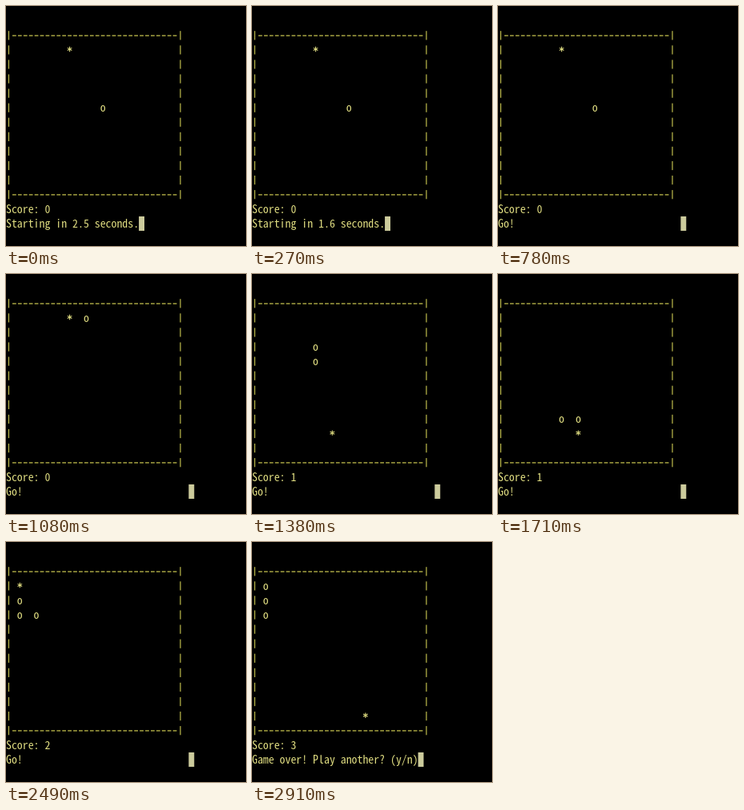
An HTML page with a canvas that plays this animation: 300x300 px, repeating every 2940 ms.

```html
<!DOCTYPE html>
<html>
<head>
<meta charset="utf-8">
<style>
html, body { margin: 0; width: 100%; height: 100%; overflow: hidden; background: #000; }
canvas { display: block; }
</style>
</head>
<body>
<canvas id="stage" width="300" height="300"></canvas>
<script>
const ctx = document.getElementById('stage').getContext('2d');
const LOOP = 2940, TICK = 30;
const CELL = 6.92, LINE = 18.08, BASE = 41.8; // terminal grid
const START = 24.9, STEP = 2.2, GO = 25;      // in ticks
const CRASH = 28;                             // move that hits the wall
const MEALS = [6, 15, 27];                    // moves that reach the food
const FOOD = [[3, 0], [4, 8], [0, 0], [6, 9]];
const TEXT = '#dfdc80', BORDER = '#bfbc4c', CURSOR = '#cccb9c';

// The snake's route, one cell per move
const path = [[5, 4]];
for (const [dir, count] of ['U4', 'L2', 'D7', 'R1', 'D1', 'L3', 'U6', 'L1', 'U2']) {
  const [dx, dy] = { U: [0, -1], D: [0, 1], L: [-1, 0], R: [1, 0] }[dir];
  for (let i = 0; i < +count; i++) {
    const [x, y] = path[path.length - 1];
    path.push([x + dx, y + dy]);
  }
}

// Pick the font size whose advance equals one cell
const family = '"Noto Sans Mono CJK JP", "Liberation Mono", monospace';
ctx.font = '100px ' + family;
const fontSize = 100 * CELL / ctx.measureText('o').width;
ctx.font = fontSize + 'px ' + family;
ctx.textAlign = 'center';

const center = col => (col + 0.5) * CELL;
const baseline = row => BASE + row * LINE;

function print(text, col, row) {
  ctx.fillStyle = TEXT;
  [...text].forEach((ch, i) => ctx.fillText(ch, center(col + i), baseline(row)));
}

const putSegment = ([x, y]) => print('o', 2 + 3 * x, y + 1);

// Three crossing strokes
function putFood([x, y]) {
  ctx.strokeStyle = TEXT;
  ctx.lineWidth = 1.1;
  ctx.beginPath();
  for (const angle of [30, 90, 150]) {
    const dx = 3.2 * Math.cos(angle * Math.PI / 180);
    const dy = 3.2 * Math.sin(angle * Math.PI / 180);
    const cx = center(2 + 3 * x), cy = baseline(y + 1) - 5.9;
    ctx.moveTo(cx - dx, cy - dy);
    ctx.lineTo(cx + dx, cy + dy);
  }
  ctx.stroke();
}

function drawBorder() {
  ctx.fillStyle = BORDER;
  for (let row = 0; row < 12; row++)
    for (const col of [0, 31])
      ctx.fillRect(center(col) - 0.6, baseline(row) - 10.6, 1.2, 11.2);
  for (const row of [0, 11])
    for (let col = 1; col < 31; col++)
      ctx.fillRect(center(col) - 2.4, baseline(row) - 5.4, 4.8, 1.3);
}

function draw(now) {
  const tick = Math.floor(now % LOOP / TICK);
  const move = Math.max(0, Math.floor((tick - START) / STEP));
  const over = move >= CRASH;
  const pos = Math.min(move, CRASH - 1);
  const score = MEALS.filter(m => m <= pos).length;
  const length = 1 + MEALS.filter(m => m < pos).length;

  ctx.fillStyle = '#000';
  ctx.fillRect(0, 0, 300, 300);

  drawBorder();
  putFood(FOOD[score]);
  path.slice(pos + 1 - length, pos + 1).forEach(putSegment);

  const message = over ? 'Game over! Play another? (y/n)'
    : tick < GO ? `Starting in ${((GO - tick) / 10).toFixed(1)} seconds.`
    : 'Go!';
  print('Score: ' + score, 0, 12);
  print(message, 0, 13);

  const cursor = message === 'Go!' ? 33 : message.length;
  ctx.fillStyle = CURSOR;
  ctx.fillRect(cursor * CELL, 263, CELL, 18);
  requestAnimationFrame(draw);
}
draw(performance.now());
</script>
</body>
</html>
```
